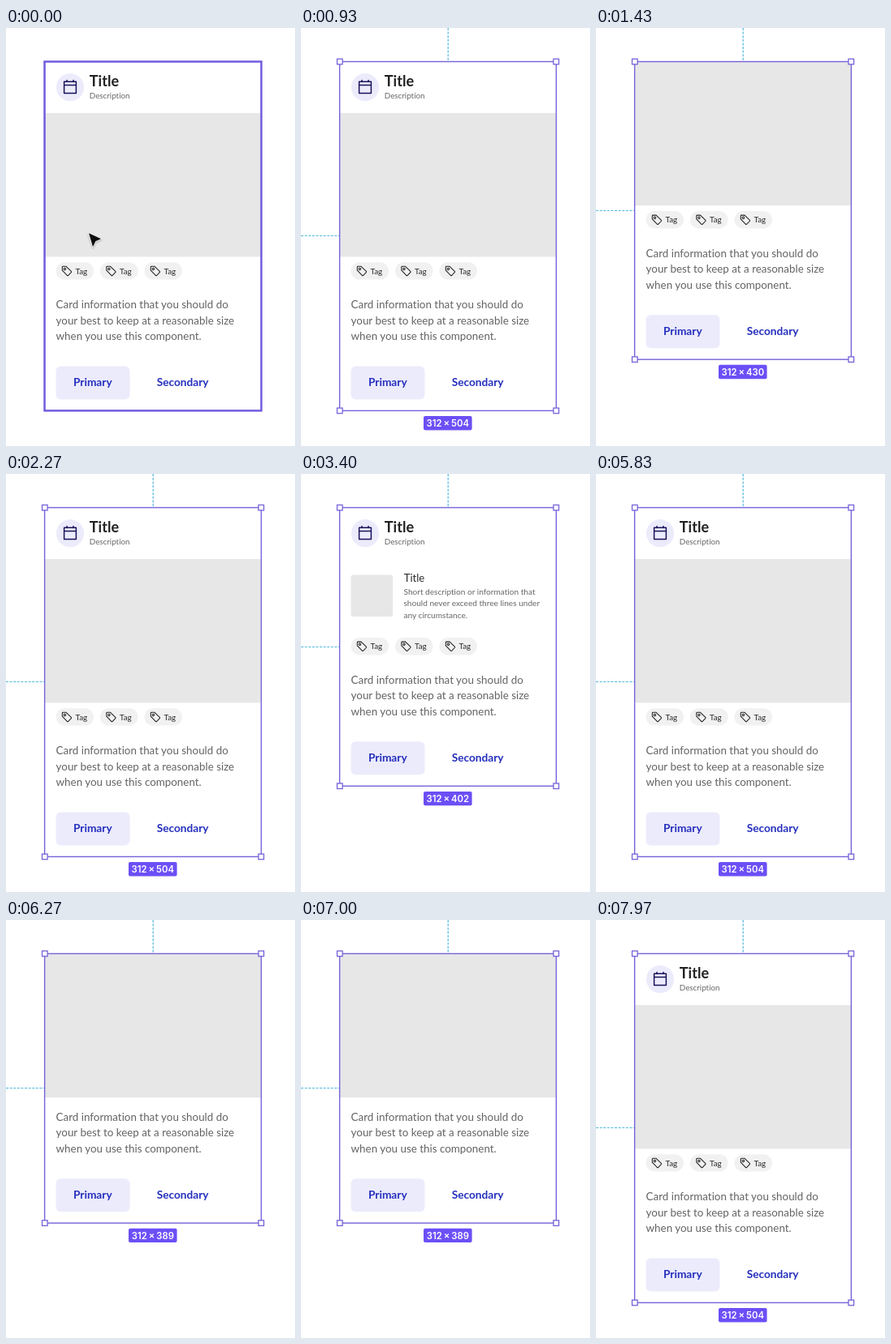
These frames come from a looping animation (356 px wide and 516 px high, 8 s). An HTML page:

```html
<!DOCTYPE html>
<html lang="en">
<head>
<meta charset="utf-8">
<title>Card variants</title>
<style>
  html, body { margin: 0; width: 100%; height: 100%; overflow: hidden; background: #fff; }
  svg { display: block; width: 100%; height: 100%; }
  text { font-family: Lato, "Open Sans", sans-serif; font-variant-ligatures: none; }
  .soft { fill: #ecebfc; }
  .media { fill: #e7e7e7; }
  .head { font-weight: 700; font-size: 18.1px; fill: #222; }
  .sub { font-size: 9.8px; fill: #666; }
  .body { font-size: 13.4px; fill: #636363; }
  .small { font-size: 10.1px; fill: #666; }
  .action { font-weight: 700; font-size: 13.7px; fill: #2530bd; text-anchor: middle; }
  .tag { font-size: 9.8px; fill: #2b2b2b; }
  .size { font: 600 11.3px Inter, sans-serif; word-spacing: -.9px; fill: #fff; text-anchor: middle; }
  .icon { fill: none; stroke-linejoin: round; stroke-linecap: round; }
  .guide { stroke: #4fb8dc; stroke-width: 1.2; stroke-dasharray: 3 1.6; }
</style>
</head>
<body>
<svg viewBox="0 0 356 516">
  <defs>
    <g id="tag">
      <rect x="61.5" y="289.2" width="46.5" height="21.4" rx="10.7" fill="#f1f1f1"/>
      <g class="icon" stroke="#222" stroke-width="1.05" transform="translate(75 300)">
        <path d="M-4.9-5.7h4L5.3.3q.7.7 0 1.4L1.7 5.3q-.7.7-1.4 0L-5.7-.9v-4q0-.8.8-.8z"/>
        <circle cx="-2.6" cy="-2.6" r="1.2"/>
      </g>
      <text class="tag" x="85.5" y="303.5">Tag</text>
    </g>
    <filter id="shade" x="-50%" y="-50%" width="200%" height="200%">
      <feDropShadow dx="0" dy="1" stdDeviation="1" flood-opacity=".35"/>
    </filter>
  </defs>

  <g id="header">
    <circle class="soft" cx="79" cy="73.2" r="17.1"/>
    <path class="icon" stroke="#17125a" stroke-width="1.5"
      d="M71.6 66.3h14.8v14.2h-14.8zM71.6 70.4h14.8M75 64.5v2M83 64.5v2"/>
    <text class="head" x="102.8" y="72">Title</text>
    <text class="sub" x="102.8" y="87.2">Description</text>
  </g>

  <rect id="wide" class="media" x="48" y="105" width="266" height="177.4"/>

  <g id="compact">
    <rect class="media" x="61.5" y="124.5" width="51.6" height="51.4" rx="2.5"/>
    <text x="126.7" y="133" font-size="13.1" fill="#2b2b2b">Title</text>
    <text class="small" x="126.5" y="148.8">Short description or information that</text>
    <text class="small" x="126.5" y="163.3">should never exceed three lines under</text>
    <text class="small" x="126.5" y="177.8">any circumstance.</text>
  </g>

  <g id="tags">
    <use href="#tag"/>
    <use href="#tag" x="54.5"/>
    <use href="#tag" x="109"/>
  </g>

  <g id="footer">
    <text class="body" x="61.6" y="346">Card information that you should do</text>
    <text class="body" x="61.6" y="365.5">your best to keep at a reasonable size</text>
    <text class="body" x="61.6" y="385">when you use this component.</text>
    <rect class="soft" x="61.5" y="417.4" width="91" height="41" rx="6"/>
    <text class="action" x="106.8" y="442.3">Primary</text>
    <text class="action" x="217.6" y="442.3">Secondary</text>
  </g>

  <g id="hover">
    <rect x="47.5" y="41.5" width="267" height="430.9" fill="none" stroke="#705ce0" stroke-width="2.5"/>
    <path d="M102 253.3 117.2 260.3 110.4 263.2 107 270.2z" fill="#111" stroke="#fff"
      stroke-width="1.4" stroke-linejoin="round" paint-order="stroke" filter="url(#shade)"/>
  </g>

  <g id="selection">
    <path class="guide" d="M181.2 0V40.5"/>
    <path id="side" class="guide" d="M0 0H47"/>
    <g stroke="#7562d9" stroke-width="1.4">
      <rect id="frame" x="47.6" y="41.5" width="266.8" fill="none"/>
      <g id="handles" fill="#fff" stroke-width="1.3"></g>
    </g>
    <g id="badge">
      <rect x="151" y="7" width="59.6" height="17.3" rx="2" fill="#6c4ff6"/>
      <text id="size" class="size" x="180.8" y="19.8"></text>
    </g>
  </g>
</svg>
<script>
const LOOP = 8000, TOP = 41.5, SCALE = 0.855;
const $ = id => document.getElementById(id);

const full = { height: 504, header: true, tags: true };
const noHeader = { height: 430, tags: true, lift: 63.2 };
const compact = { height: 402, header: true, tags: true, compact: true, lift: 87.2 };
const bare = { height: 389, lift: 63.2 };

const steps = [
  [0, { ...full, hover: true }],
  [230, full],
  [1230, noHeader],
  [2000, full],
  [3400, compact],
  [5400, full],
  [6270, bare],
  [7030, full],
];

const handles = [[47.8, 0], [314.3, 0], [47.8, 1], [314.3, 1]].map(([x, low]) => {
  const box = document.createElementNS("http://www.w3.org/2000/svg", "rect");
  box.setAttribute("x", x - 3.3);
  box.setAttribute("width", 6.6);
  box.setAttribute("height", 6.6);
  $("handles").append(box);
  return { box, low };
});

const show = (id, on) => $(id).setAttribute("display", on ? "inline" : "none");
const shift = (id, y) => $(id).setAttribute("transform", `translate(0 ${y})`);

function draw(state) {
  const height = state.height * SCALE;
  const lift = state.lift || 0;

  show("header", state.header);
  show("wide", !state.compact);
  show("compact", state.compact);
  show("tags", state.tags);
  show("hover", state.hover);
  show("selection", !state.hover);

  shift("wide", -lift);
  shift("tags", -lift);
  shift("footer", -lift - (state.tags ? 0 : 35));
  shift("side", Math.floor(TOP + height / 2 - 0.3) + 0.5);
  shift("badge", TOP + height - 0.3);

  $("frame").setAttribute("height", height);
  $("size").textContent = `312 × ${state.height}`;
  for (const { box, low } of handles) box.setAttribute("y", TOP + low * height - 3.3);
}

let current;
function tick(now) {
  const t = now % LOOP;
  const state = steps.findLast(([start]) => start <= t)[1];
  if (state !== current) draw(current = state);
  requestAnimationFrame(tick);
}
tick(performance.now());
</script>
</body>
</html>
```
